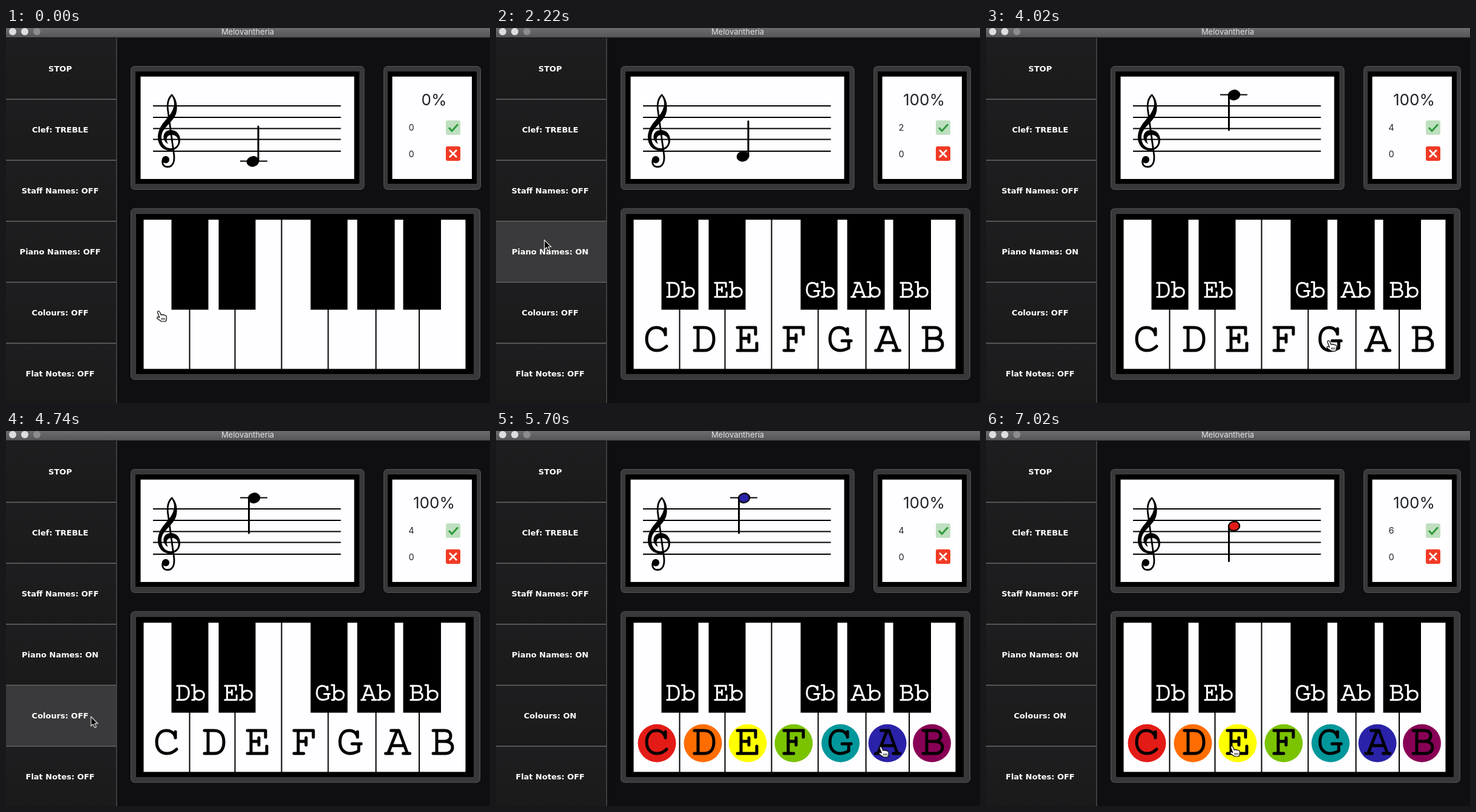
These frames come from a looping animation (800x621 px, 7.05 s). An HTML page:

```html
<!DOCTYPE html>
<html lang="en">
<head>
<meta charset="utf-8">
<title>Piano trainer</title>
<style>
html, body { margin: 0; width: 100%; height: 100%; overflow: hidden; background: #0f0e10; }
svg { display: block; width: 100vw; height: 100vh; }
text { font-family: Inter, "Open Sans", sans-serif; text-anchor: middle; }
.menu { font: bold 13px "DejaVu Sans", Verdana, sans-serif; fill: #fff; }
.score { font-size: 26px; fill: #212529; }
.count { font-size: 14.5px; fill: #212529; }
.frame { fill: #383739; stroke: #565557; }
.screen { fill: #fefdff; }
.staff { stroke: #000; stroke-width: 2; }
.ink { fill: none; stroke-linecap: round; stroke-linejoin: round; }

/* Hard switches between states */
.step { animation: 7.05s step-end infinite; }
.show { opacity: 0; }
@keyframes round0 { 0% { opacity: 1 } 7.1% { opacity: 0 } }
@keyframes round1 { 7.1% { opacity: 1 } 21.3% { opacity: 0 } }
@keyframes round2 { 21.3% { opacity: 1 } 47.5% { opacity: 0 } }
@keyframes round3 { 47.5% { opacity: 1 } 56% { opacity: 0 } }
@keyframes round4 { 56% { opacity: 1 } 83.7% { opacity: 0 } }
@keyframes round5 { 83.7% { opacity: 1 } 95% { opacity: 0 } }
@keyframes round6 { 95%, to { opacity: 1 } }
@keyframes namesOn { 30.2%, to { opacity: 1 } }
@keyframes namesOff { 30.2%, to { opacity: 0 } }
@keyframes coloursOn { 70.2%, to { opacity: 1 } }
@keyframes coloursOff { 70.2%, to { opacity: 0 } }
@keyframes hoverNames { 26.8% { opacity: 1 } 37.5% { opacity: 0 } }
@keyframes hoverColours { 64% { opacity: 1 } 73.3% { opacity: 0 } }
@keyframes arrow { 26.1%, 63.2% { opacity: 1 } 38.4%, 74% { opacity: 0 } }
@keyframes hand { 26.1%, 63.2% { opacity: 0 } 38.4%, 74% { opacity: 1 } }

#cursor { animation: travel 7.05s ease-in-out infinite; }
@keyframes travel {
  0%, 8.5% { transform: translate(254px, 469px) }
  14.5%, 22.7% { transform: translate(348.5px, 518px) }
  30%, 33.3% { transform: translate(80px, 351px) }
  43%, 48.5% { transform: translate(353.5px, 515px) }
  54%, 57.5% { transform: translate(568px, 518px) }
  66%, 71.5% { transform: translate(140.5px, 473px) }
  79.5%, 84.5% { transform: translate(637.5px, 523px) }
  91.5%, 100% { transform: translate(408px, 522px) }
}
</style>
</head>
<body>
<svg viewBox="0 0 800 621" preserveAspectRatio="none">
  <defs>
    <linearGradient id="bar" x2="0" y2="1"><stop stop-color="#6c6b6d"/><stop offset="1" stop-color="#555456"/></linearGradient>
    <linearGradient id="button" x2="0" y2="1"><stop stop-color="#1e1d1f"/><stop offset="1" stop-color="#1a1a1b"/></linearGradient>
  </defs>

  <rect width="800" height="621" fill="#0f0e10"/>
  <rect width="800" height="16" fill="url(#bar)"/>
  <rect y="15.5" width="800" height="1" fill="#1a191b"/>
  <g fill="#dedddf"><circle cx="11" cy="6" r="6"/><circle cx="31" cy="6" r="6"/><circle cx="51" cy="6" r="6" fill="#8d8b8e"/></g>
  <text x="399.5" y="11" font-size="13" fill="#e4e3e5">Melovantheria</text>

  <g id="menu"></g>
  <rect x="182" y="16.5" width="1.5" height="605" fill="#4b4a4d"/>

  <g id="panels"></g>

  <g id="staff"></g>
  <g id="clef">
    <path d="M274 109C281 116 284 126 282 138C280 151 267 159 260 170C255 178 256 190 263 196C270 201 279 200 283 194C287 187 284 177 274 177C266 177 263 184 268 192C258 187 258 174 267 170C278 166 289 174 288 187C287 199 277 204 268 203C256 201 250 190 251 179C252 163 264 153 269 146C275 139 280 128 277 119C276 115 274 114 274 109Z"/>
    <path class="ink" stroke="#000" stroke-width="2.8" d="M274 111C267 118 266 128 268 139L277 205C280 221 276 230 267 230C260 230 257 224 259.500 217"/>
    <circle cx="264" cy="218" r="6"/>
  </g>
  <g id="rounds"></g>

  <text class="score step show" style="animation-name:round0" x="707.5" y="128">0%</text>
  <text class="score step" style="animation-name:firstHit" x="707.5" y="128">100%</text>
  <text class="count" x="670" y="213.500">0</text>
  <rect x="727" y="153" width="24" height="24" rx="3" fill="#bfe0c0"/>
  <path fill="none" stroke="#2f9a3c" stroke-width="3" d="M732 165l5 5.500 10-11"/>
  <rect x="727" y="196" width="24" height="24" rx="3" fill="#f13a25"/>
  <path stroke="#fff" stroke-width="2.800" d="M733 202l12 12m0-12l-12 12"/>

  <g id="piano"></g>

  <g id="cursor">
    <g class="step" style="animation-name:hand" stroke="#000" stroke-width="1.2" stroke-linejoin="round">
      <path fill="#fff" d="M-3.500 2C-4-.5-.8-1 0 1L2.500 6.500C3 5 5 5 5.500 6.500C6.500 5.500 8.300 6 8.700 7.300C10 6.500 11.300 7.500 11.300 9V13L10 17H3L-3.500 12.500C-5.500 10.500-3.500 8.500-1.500 9.800L-.3 10.500Z"/>
      <path fill="none" stroke-width="1" d="M3.500 11v3.500m2.300-3.500v3.500m2.300-3.500v3.500"/>
    </g>
    <path class="step show" style="animation-name:arrow" stroke="#fff" stroke-width="1.1" d="M0 0V15.500L3.600 12.300 6 18 8.700 16.900 6.300 11.300H11Z"/>
  </g>
</svg>
<style>
@keyframes firstHit { 0% { opacity: 0 } 7.1%, to { opacity: 1 } }
</style>
<script>
const fill = (id, html) => { document.getElementById(id).innerHTML = html; };
const rect = (x, y, right, bottom, attrs) =>
  `<rect x="${x}" y="${y}" width="${right - x}" height="${bottom - y}" ${attrs}/>`;
const step = (name, shown, body) =>
  `<g class="step ${shown ? '' : 'show'}" style="animation-name:${name}">${body}</g>`;

// Side menu
const label = (i, text) => `<text class="menu" x="89.5" y="${72 + i * 101}">${text}</text>`;
const toggle = (i, text, name) =>
  step(name + 'Off', true, label(i, text + ': OFF')) + step(name + 'On', false, label(i, text + ': ON'));
const button = (i, color) => rect(0, 17 + i * 101, 182, 118 + i * 101, `fill="${color}"`);
const captions = [
  label(0, 'STOP'), label(1, 'Clef: TREBLE'), label(2, 'Staff Names: OFF'),
  toggle(3, 'Piano Names', 'names'), toggle(4, 'Colours', 'colours'), label(5, 'Flat Notes: OFF')
];
const hovers = { 3: 'hoverNames', 4: 'hoverColours' };
fill('menu', captions.map((caption, i) =>
  button(i, 'url(#button)') + (hovers[i] ? step(hovers[i], false, button(i, '#3a393b')) : '') +
  (i ? rect(0, 16 + i * 101, 182, 18 + i * 101, 'fill="#555457"') : '') + caption).join(''));

// Framed screens
const panel = (outer, inner, screen) =>
  rect(...outer, 'rx="6" class="frame"') + rect(...inner, '') + rect(...screen, 'class="screen"');
fill('panels',
  panel([206.5, 63.5, 592, 267.5], [214, 72, 584, 258], [222.5, 80.5, 575.5, 250]) +
  panel([624.5, 63.5, 784.5, 267.5], [631, 72, 778, 258], [638.5, 80.5, 770, 250]) +
  panel([206.5, 299, 783.5, 582], [215, 308, 773, 573], [227.5, 317.5, 759.5, 564.5]));

// Staff and notes
const colours = { C: '#e31b17', D: '#ff6d00', E: '#ffff00', F: '#7ac300', G: '#00979b', A: '#2a22a8', B: '#880055' };
const line = (x1, x2, y) => `<path class="staff" d="M${x1} ${y}H${x2}"/>`;
fill('staff', [129, 148, 166.5, 184.5, 204].map(y => line(243, 553.5, y)).join(''));

function note(letter, y) {
  const up = y > 170, x = up ? 408 : 410;
  const stem = up ? `M417 ${y}V${y - 58}` : `M401.5 ${y}V${y + 58}`;
  const head = (rx, ry, color) =>
    `<ellipse rx="${rx}" ry="${ry}" fill="${color}" transform="translate(${x} ${y}) rotate(-12)"/>`;
  return (y > 215 || y < 115 ? line(387, 432, y - 0.5) : '') +
    `<path class="ink" stroke="#000" stroke-width="3" d="${stem}"/>` + head(10.4, 8.8, '#000') +
    step('coloursOn', false, head(8, 6.6, colours[letter]));
}
const melody = [['C', 221], ['D', 147.5], ['D', 212.5], ['G', 184.5], ['A', 111], ['E', 138.5], ['C', 157.5]];
fill('rounds', melody.map(([letter, y], i) => step('round' + i, false,
  note(letter, y) + `<text class="count" x="670" y="170">${i}</text>`)).join(''));

// Piano: slab letters are drawn as strokes on a 38-unit cap height
const glyphs = {
  C: 'M15 12V2M15 11C13 4 7 0 0 0C-10 0-16 8-16 19C-16 31-9 38 1 38C8 38 13 35 17 31',
  D: 'M-16 0H0C11 0 16 8 16 19S11 38 0 38H-16M-10 0V38',
  E: 'M-16 0H14V11M-16 38H16V26M-10 0V38M-10 18H3M3 12V24',
  F: 'M-16 0H16V11M-16 38H0M-9 0V38M-9 18H4M4 12V24',
  G: 'M13 11V2M13 10C11 4 6 0-1 0C-11 0-16 8-16 19C-16 31-9 38 1 38C7 38 11 36 15 34V22M4 22H19',
  A: 'M-11 0H2L16 38M-1 0L-16 38M-20 38H-9M9 38H20M-11 25H11',
  B: 'M-16 0H3C10 0 13 4 13 9S9 18 3 18H-10M3 18C12 18 16 22 16 28S11 38 4 38H-16M-10 0V38',
  b: 'M-17-2H-10V38H-16M-10 24C-8 16-3 13 2 13C11 13 16 18 16 25S11 38 2 38C-3 38-8 34-10 28'
};
const glyph = (letter, x, y, scale, color) =>
  `<path class="ink" role="img" aria-label="${letter}" stroke="${color}" stroke-width="5"
    transform="translate(${x} ${y}) scale(${scale})" d="${glyphs[letter]}"/>`;

const gaps = [303.5, 378.5, 455.5, 532.5, 611.5, 683];
const blackKeys = [['D', 273.5, 334.5, 305], ['E', 351.5, 412.5, 384], ['G', 503.5, 564.5, 536],
  ['A', 580.5, 642.5, 612], ['B', 656.5, 719, 691]];
const letterX = { C: 265, D: 344, E: 415, F: 492, G: 568, A: 647.5, B: 722 };
const dotX = { C: 266, D: 342, E: 416, F: 492, G: 569.5, A: 647, B: 720.5 };

const dots = Object.keys(dotX).map(k =>
  `<circle cx="${dotX[k]}" cy="517" r="31.5" fill="${colours[k]}"/>`).join('');
const names = Object.keys(letterX).map(k => glyph(k, letterX[k], 496, 1, '#000')).join('') +
  blackKeys.map(([k, , , x]) =>
    glyph(k, x - 12.5, 422, 0.61, '#fff') + glyph('b', x + 12.5, 422, 0.61, '#fff')).join('');

fill('piano',
  gaps.map(x => rect(x - 1, 317, x + 1, 565, '')).join('') +
  blackKeys.map(([, left, right]) => rect(left, 317, right, 466.5, '')).join('') +
  step('coloursOn', false, dots) + step('namesOn', false, names));
</script>
</body>
</html>
```
